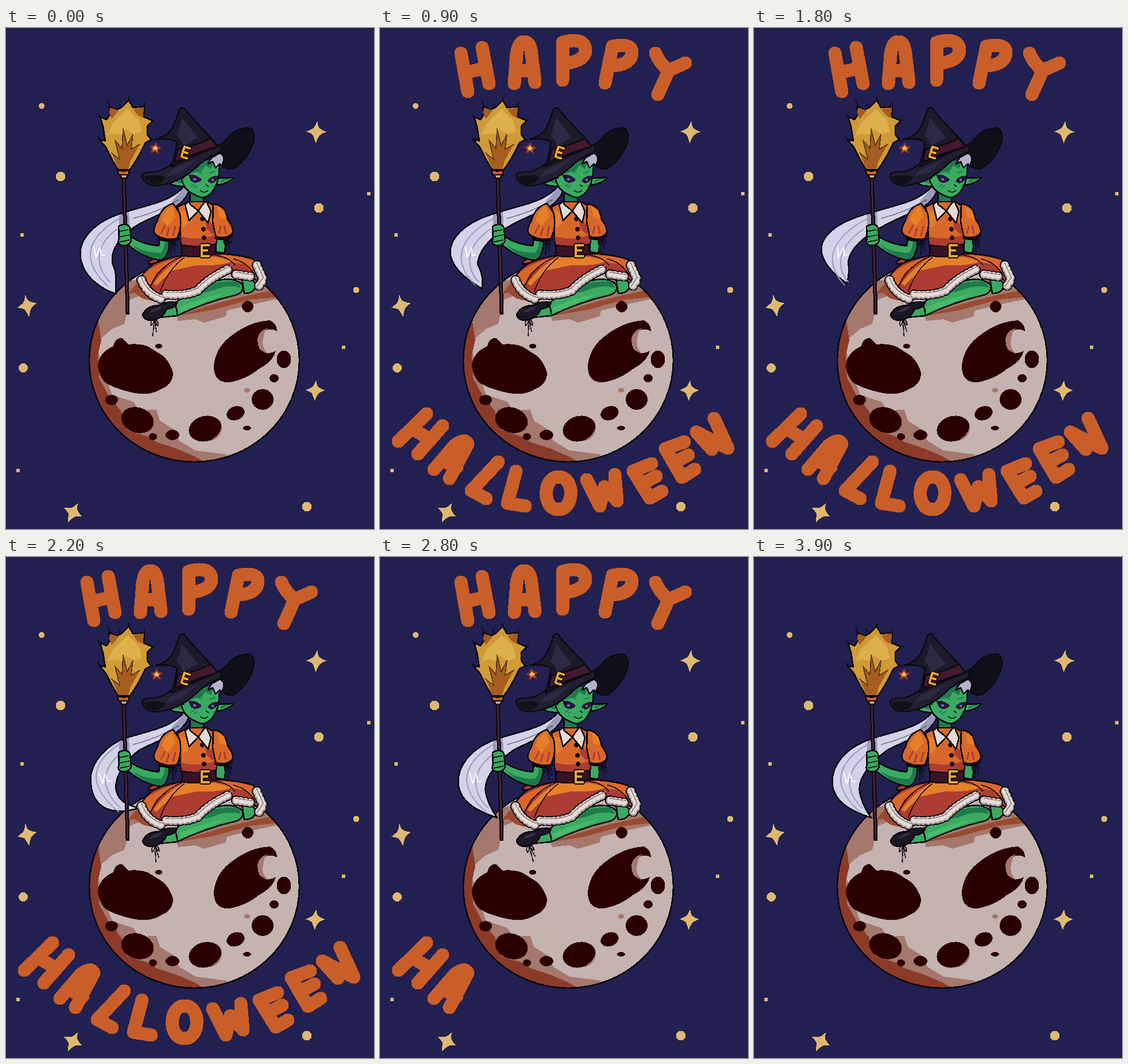
Recreate the animation shown at these times as an HTML page without scripts. Size 641 by 874 pixels, loop 4 s.

```html
<!DOCTYPE html>
<html lang="en">
<head>
<meta charset="utf-8">
<title>Witch on the moon</title>
<style>
@property --t { syntax: "<number>"; inherits: true; initial-value: 0; }
html, body { margin: 0; width: 100%; height: 100%; overflow: hidden; background: #212051; }
svg { display: block; width: 641px; height: 874px; shape-rendering: crispEdges; }
path { stroke-linecap: round; stroke-linejoin: round; }

.o { stroke: #0b0810; stroke-width: 2.6; }
.line { fill: none; stroke: #0b0810; stroke-width: 1.6; }
.gold { fill: #dfb870; }
.crater { fill: #2a0001; }
.green { fill: #3aaa60; }
.deep { fill: #1f7a4c; }
.orange { fill: #d8682a; }
.red { fill: #ad3c32; }
.lit { fill: #e58029; }
.white { fill: #e2dad6; }

/* Lettering: --t counts tenths of a second, two letters per tick */
.letters { fill: none; stroke: #ca5e28; stroke-width: 23; animation: clock 4s steps(40) infinite; }
.letters path { opacity: min(2 * var(--t) - var(--i) + 1, 64 - var(--i) - 2 * var(--t)); }
@keyframes clock { to { --t: 40; } }

.bob { animation: bob .8s step-end infinite; }
@keyframes bob { 50%, to { transform: translateY(-5px); } }

.swing { animation: swing .8s steps(4) infinite; }
@keyframes swing {
  0%, to { transform: rotate(var(--a)); }
  50% { transform: rotate(var(--b)); }
}

.tail { animation: tail .8s infinite step-end; }
@keyframes tail {
  0%, to { d: path("M205 322C152 338 125 370 130 402C136 435 165 455 192 464C188 448 196 435 187 415C178 390 200 360 232 342"); }
  12.5% { d: path("M205 322C147 338 118 368 123 398C130 425 155 440 178 455C180 440 178 428 170 412C172 385 198 360 232 342"); }
  25% { d: path("M205 322C142 338 112 365 118 394C124 415 140 430 162 446C166 432 166 420 164 408C168 382 196 360 232 342"); animation-timing-function: steps(2); }
  50%, 87.5% { d: path("M205 322C157 338 132 372 137 405C143 435 170 448 204 460C196 448 188 435 184 415C180 390 205 362 232 342"); }
  50% { animation-timing-function: steps(2); }
  75% { d: path("M205 322C167 338 143 372 148 402C152 440 180 458 232 443C212 438 196 432 192 412C188 392 205 362 232 342"); }
}
.strands { transform-origin: 205px 335px; animation: strands .8s infinite step-end; }
@keyframes strands {
  0%, to { transform: skewX(0deg); }
  12.5% { transform: skewX(-5deg); }
  25% { transform: skewX(-9deg); animation-timing-function: steps(2); }
  50%, 87.5% { transform: skewX(4deg); }
  50% { animation-timing-function: steps(2); }
  75% { transform: skewX(10deg); }
}
</style>
</head>
<body>
<svg viewBox="0 0 641 874" role="img" aria-label="Happy Halloween">
<defs>
  <path id="spark" d="M0-19Q2-7 6-6Q10-3 18-1Q9 2 6 6Q3 10 0 20Q-4 10-6 6Q-10 3-18 1Q-10-3-6-6Q-3-9 0-19Z"/>
  <clipPath id="disc"><ellipse cx="328" cy="580" rx="183" ry="177"/></clipPath>
  <path id="bow" class="line" d="M0 0Q-8 2-6 9Q-2 8 0 0Q8 3 6 9Q2 7 0 0M0 0L-2 24M0 0L4 18"/>
  <path id="frill" fill="none" d="M236 440Q246 466 274 474M279 465Q312 468 334 458Q352 437 393 418M401 430L428 434M437 414L448 439L438 454"/>
</defs>

<rect width="641" height="874" fill="#212051"/>
<g class="gold">
  <use href="#spark" transform="translate(541 181) rotate(4)"/>
  <use href="#spark" transform="translate(37 484) rotate(-10)"/>
  <use href="#spark" transform="translate(539 632) scale(.95) rotate(4)"/>
  <use href="#spark" transform="translate(117 845) rotate(28)"/>
  <circle cx="62" cy="136" r="5"/><circle cx="95" cy="259" r="8.5"/>
  <circle cx="545" cy="314" r="8.5"/><circle cx="632" cy="289" r="3.5"/>
  <circle cx="28" cy="361" r="3.5"/><circle cx="610" cy="457" r="5.5"/>
  <circle cx="588" cy="557" r="3.5"/><circle cx="30" cy="593" r="8"/>
  <circle cx="21" cy="772" r="3.5"/><circle cx="524" cy="835" r="8.5"/>
</g>

<g class="letters">
  <path style="--i:1" d="M141 44L153 111M178 34L190 97M148 78L184 70"/>
  <path style="--i:2" d="M234 97L238 46Q241 24 251 24Q262 24 264 46L270 95M237 74H267"/>
  <path style="--i:3" d="M318 91L318 25Q356 15 358 38Q358 58 320 62"/>
  <path style="--i:4" d="M392 96L405 32Q439 25 439 44Q436 66 400 66"/>
  <path style="--i:5" d="M480 44Q487 62 503 74L532 61M503 74L484 116"/>
  <path style="--i:6" d="M81 673L32 721M109 694L66 743M56 699L88 718"/>
  <path style="--i:7" d="M94 770L130 728Q149 714 153 726L121 786M110 755L134 766"/>
  <path style="--i:8" d="M206 757L159 807L185 821"/>
  <path style="--i:9" d="M237 773L222 829L253 834"/>
  <path style="--i:10" d="M311 783C340 783 339 840 311 840C282 840 283 783 311 783Z"/>
  <path style="--i:11" d="M360 788L383 834L391 800L413 825L409 779"/>
  <path style="--i:12" d="M473 760L441 773L470 820L491 808M455 796L481 782"/>
  <path style="--i:13" d="M530 722L497 734L526 784L548 770M511 759L537 745"/>
  <path style="--i:14" d="M578 735L551 705L606 733L582 681"/>
</g>

<g class="bob">
  <!-- Moon -->
  <g clip-path="url(#disc)">
    <rect x="140" y="395" width="380" height="370" fill="#c5b3b1"/>
    <path fill="#a4786c" d="M250 440L236 466L216 474L211 496L206 516L185 525L166 541L160 560L170 600L185 640L222 652L232 667L262 666L268 685L292 700L302 720L330 737L385 744L340 790L140 740V440Z"/>
    <path fill="#8c3a28" d="M182 462L160 505L166 545L160 570L162 610L178 640L200 668L212 702L245 712L262 722L300 735L330 748L350 760L345 790L130 780V462Z"/>
    <path fill="#a4786c" d="M296 500L340 440H470L485 470L430 482L385 493L383 503L345 514L330 508L300 511Z"/>
    <path fill="#9a4a30" d="M212 464L232 440L262 478L238 472L224 462ZM300 502Q390 470 480 455L485 468L425 474L360 492Z"/>
  </g>
  <g class="crater">
    <path d="M160 588Q162 566 187 555Q190 540 203 541L213 552Q240 549 255 560L272 571Q286 582 291 602Q290 622 272 629Q252 642 225 637Q190 630 172 618Q161 605 160 588Z"/>
    <path d="M362 588Q366 555 395 535Q425 512 460 510Q472 516 472 529Q455 520 443 535Q435 548 442 560Q455 572 470 563Q465 582 440 595Q420 612 390 618Q361 620 362 588Z"/>
    <circle cx="421" cy="486" r="10"/>
    <ellipse cx="484" cy="578" rx="12.5" ry="15.5"/>
    <ellipse cx="467" cy="611" rx="8" ry="7"/>
    <ellipse cx="447" cy="648" rx="19" ry="18"/>
    <ellipse cx="420" cy="698" rx="7" ry="4"/>
    <ellipse cx="290" cy="710" rx="12" ry="9"/>
    <ellipse cx="256" cy="713" rx="7" ry="6"/>
    <ellipse cx="184" cy="649" rx="11" ry="9"/>
    <ellipse cx="266" cy="555" rx="6" ry="4"/>
    <ellipse rx="16" ry="12" transform="translate(400 672) rotate(-20)"/>
    <ellipse rx="29" ry="22" transform="translate(347 699) rotate(-15)"/>
    <ellipse rx="29" ry="22" transform="translate(229 684) rotate(18)"/>
  </g>
  <g fill="#a4786c">
    <path d="M456 523Q437 530 438 547Q442 565 456 568Q444 555 448 543Q449 530 456 523ZM376 696Q376 716 354 721Q371 712 376 696Z"/>
    <ellipse cx="420" cy="632" rx="5" ry="4"/>
  </g>
  <ellipse class="o" cx="328" cy="580" rx="183" ry="177" fill="none"/>

  <!-- Ponytail -->
  <g fill="#d3d2e8">
    <path class="o tail" d="M205 322"/>
    <path class="o" d="M205 322C240 310 288 304 310 276L318 285C310 312 270 322 232 342"/>
    <path fill="#9c9aba" d="M310 279L317 285Q306 308 282 317L290 301ZM197 326L214 321L216 353L197 368Z"/>
  </g>
  <path class="line" stroke-opacity=".45" d="M222 332Q265 321 300 300"/>
  <g class="strands" fill="none" stroke="#9c9aba" stroke-width="2">
    <path d="M198 332Q145 362 147 400Q150 425 176 449M193 351Q155 380 164 415Q168 430 181 443"/>
    <path stroke="#fff" d="M153 382L157 400L164 383L166 397L172 396"/>
  </g>

  <!-- Broom -->
  <path d="M205 258L212 497" stroke="#0b0810" stroke-width="7"/>
  <path d="M205 260L212 495" stroke="#4a2230" stroke-width="3"/>
  <path class="line" stroke-width="2" d="M181 143Q182 134 177 126M214 133L214 121M239 143Q243 138 241 131M248 167Q253 164 259 160M249 190L257 196M170 160Q164 158 160 150M171 198Q163 196 160 190M202 139L196 132"/>
  <path class="o" fill="#d09a37" d="M195 247Q183 228 174 208L162 194L173 197L169 172L164 155L175 160L182 150L179 136L192 143L202 138L214 126L221 139L241 137L240 155L256 162L246 171L246 186L253 195L243 200Q230 228 216 247Z"/>
  <path fill="#deb04c" d="M186 166L212 142L231 160L237 181L223 186L209 176L201 186L188 184L177 186Z"/>
  <path fill="#a65d20" d="M180 148L181 139L196 144L184 159ZM222 142L240 138L239 157L229 152ZM196 246L184 218L198 229L190 196L202 210L204 176L211 205L221 186L218 211L233 203L217 232L213 246Z"/>
  <path class="line" stroke-opacity=".6" d="M184 218L198 229L190 196L202 210L204 176L211 205L221 186L218 211L233 203"/>
  <path class="o" fill="#c8602a" d="M194 247Q205 252 215 247L214 256H196Z"/>
  <path class="o" fill="#c9a182" d="M199 256H212L210 262H201Z"/>

  <!-- Legs and shoe -->
  <path class="o green" d="M411 438Q431 432 435 450Q432 463 415 463Z"/>
  <path class="o green" d="M272 490L293 481Q325 455 360 443Q395 432 411 447Q416 461 400 466Q350 477 298 502L266 505Z"/>
  <path class="deep" d="M322 463Q360 438 405 443L409 453Q384 447 360 458Q340 464 322 463Z"/>
  <path fill="#48b96d" d="M300 488Q340 470 384 462Q345 480 303 496Z"/>
  <path class="o" fill="#1b1826" d="M238 500Q245 485 265 484Q285 475 298 479Q295 489 280 490Q273 509 250 510Q239 508 238 500Z"/>
  <path fill="#34304a" d="M249 496Q258 487 273 486Q265 495 249 496Z"/>
  <path class="o" fill="none" d="M293 482Q299 490 298 502"/>
  <g transform="translate(259 508)"><g class="swing" style="--a:3deg;--b:-20deg"><use href="#bow" transform="scale(1 1.2)"/></g></g>

  <!-- Skirt -->
  <path class="o red" d="M307 397Q254 405 240 428Q228 440 234 447Q245 466 272 476L350 444L398 425L432 438L447 446Q446 418 431 403Q400 394 365 393Z"/>
  <path class="o red" d="M248 412Q248 402 270 401L262 410Z"/>
  <path class="orange" d="M235 440Q244 414 306 399L262 427L246 459ZM366 396Q410 396 431 406L444 432L416 412L396 409Z"/>
  <path class="lit" d="M308 399H365L396 407Q370 416 332 414L290 423L262 449L257 446Q275 419 308 399Z"/>
  <path class="line" d="M306 399Q263 416 248 460M310 401Q283 420 269 459M365 396Q388 400 398 413M397 403Q422 410 433 430"/>
  <use href="#frill" stroke="#0b0810" stroke-width="18" stroke-dasharray="0 8"/>
  <use href="#frill" stroke="#a89a97" stroke-width="14.5" stroke-dasharray="0 8"/>
  <use href="#frill" stroke="#e2dad6" stroke-width="11" stroke-dasharray="0 8" y="-1"/>
  <use href="#frill" stroke="#8d7e7d" stroke-width="1.6" y="-4"/>

  <!-- Arms -->
  <path class="o green" d="M363 366L380 365Q384 382 380 393L364 390Z"/>
  <path class="o green" d="M268 368L266 380Q240 378 217 364L211 377Q240 402 270 405Q286 398 284 368Z"/>
  <path class="deep" d="M222 380Q245 393 270 392Q277 384 276 374L283 373Q284 396 269 403Q240 400 222 380Z"/>
  <path class="o green" d="M196 346Q210 338 216 348L218 371Q215 381 201 379Q193 377 197 367Z"/>
  <path class="line" d="M197 355L212 352M196 365L214 361M199 373L214 370"/>

  <!-- Bodice -->
  <path class="deep o" d="M321 286L344 290V309L333 319L320 308Z"/>
  <path class="o orange" d="M299 312L318 303H350L364 311L372 340L365 383L306 383L302 340Z"/>
  <path class="red" d="M304 363Q335 373 366 360L364 380H307ZM345 318L356 341L368 345L360 361L349 350Z"/>
  <path class="lit" d="M303 318L313 321L317 340L308 350Z"/>
  <path class="o orange" d="M291 306Q270 312 264 336Q254 352 260 360Q278 372 298 367Q308 345 302 322Z"/>
  <path class="o orange" d="M361 307Q382 308 386 334Q398 350 394 359Q380 370 365 363L360 338Z"/>
  <path class="lit" d="M289 310Q276 318 271 334L281 346L295 329ZM368 311L381 319L383 334L372 330Z"/>
  <path d="M270 358L277 344M280 363L284 349M291 362L295 346M371 358L374 346M383 358L380 345" stroke="#ad3c32" stroke-width="3"/>
  <path d="M267 367Q283 374 299 368M366 366Q380 370 393 362" fill="none" stroke="#0b0810" stroke-width="5"/>
  <path class="o white" d="M319 302L312 308L319 336L335 319L352 340L357 320L349 302L344 306L335 319L321 308Z"/>
  <g fill="#1c0a14">
    <circle cx="342" cy="333" r="4"/><circle cx="344" cy="351" r="4"/><circle cx="345" cy="366" r="4"/>
  </g>
  <path class="o" fill="#3a1226" d="M307 379Q335 384 365 377L366 394Q335 402 306 397Z"/>
  <path d="M353 379H341V398H353M341 388H350" fill="none" stroke="#0b0810" stroke-width="7.5"/>
  <path d="M353 379H341V398H353M341 388H350" fill="none" stroke="#eda62e" stroke-width="4.5"/>
  <g transform="translate(290 370)"><g class="swing" style="--a:4deg;--b:-18deg"><use href="#bow"/></g></g>
  <g transform="translate(386 366)"><g class="swing" style="--a:4deg;--b:-18deg"><use href="#bow"/></g></g>

  <!-- Head -->
  <path class="o green" d="M308 262L277 264Q286 277 311 276ZM368 262L396 261Q388 271 368 274Z"/>
  <path class="deep" d="M286 266L306 265V271ZM374 265L389 263L374 270Z"/>
  <path class="o green" d="M304 248Q304 274 320 286Q336 296 344 296Q360 291 367 272Q374 252 371 232L340 236Z"/>
  <path class="deep" d="M307 252L340 233L369 228L370 242L360 238L357 246L347 240L341 250L328 252L312 259Z"/>
  <path class="o" fill="#b5b3cc" d="M288 262Q300 252 314 251L309 262ZM358 226L377 216Q385 229 379 242L372 237L365 244L360 233L352 237Z"/>
  <path fill="#24163e" d="M318 257Q331 253 341 265Q331 274 322 267ZM351 267Q356 257 370 258Q367 270 357 271Z"/>
  <path fill="#77639a" d="M326 262H331V266H326ZM358 263H362V267H358Z"/>
  <path class="line" d="M317 255L322 261M349 274L352 276M339 284Q345 289 351 284"/>
  <path d="M323 276L327 273M328 278L332 275M361 277L364 274M333 250L341 253M355 253L364 250" stroke="#237e50" stroke-width="2"/>

  <!-- Hat -->
  <path class="o" fill="#100f19" d="M352 212Q380 204 390 187Q408 172 426 175Q437 184 428 207Q417 233 395 246Q380 247 377 237Q385 222 368 216Z"/>
  <path class="o" fill="#211e31" d="M237 257Q240 250 262 251Q278 246 290 236L362 203Q382 205 372 217Q350 224 328 246Q298 272 262 275Q239 274 237 257Z"/>
  <path fill="#100f19" d="M240 259Q266 254 277 260Q275 269 259 273Q242 270 240 259Z"/>
  <path class="o" fill="#1c192b" d="M302 142Q309 135 314 145Q331 165 361 196L368 207Q330 221 288 242Q295 220 298 199Q286 191 261 194Q282 188 290 174Q297 160 302 142Z"/>
  <path fill="#2d2945" d="M306 156Q320 173 334 192L309 205Q306 194 297 188Q304 173 306 156ZM288 248L334 227L305 252L279 259Z"/>
  <path class="o" fill="#431a2d" d="M299 211Q336 204 357 192L368 207Q335 216 294 234Z"/>
  <g transform="translate(312 217) rotate(18)" fill="none">
    <path d="M6-9H-4V9H6M-4 0H4" stroke="#0b0810" stroke-width="7"/>
    <path d="M6-9H-4V9H6M-4 0H4" stroke="#eda62e" stroke-width="4"/>
  </g>
  <g transform="translate(262 193)">
    <path class="swing" style="--a:7deg;--b:-10deg" fill="#edbd62" stroke="#8f3026" stroke-width="2.5" d="M0 8L3 14L9 15L4 19L6 25L0 21L-6 25L-4 19L-9 15L-3 14Z"/>
  </g>
</g>
</svg>
</body>
</html>
```
